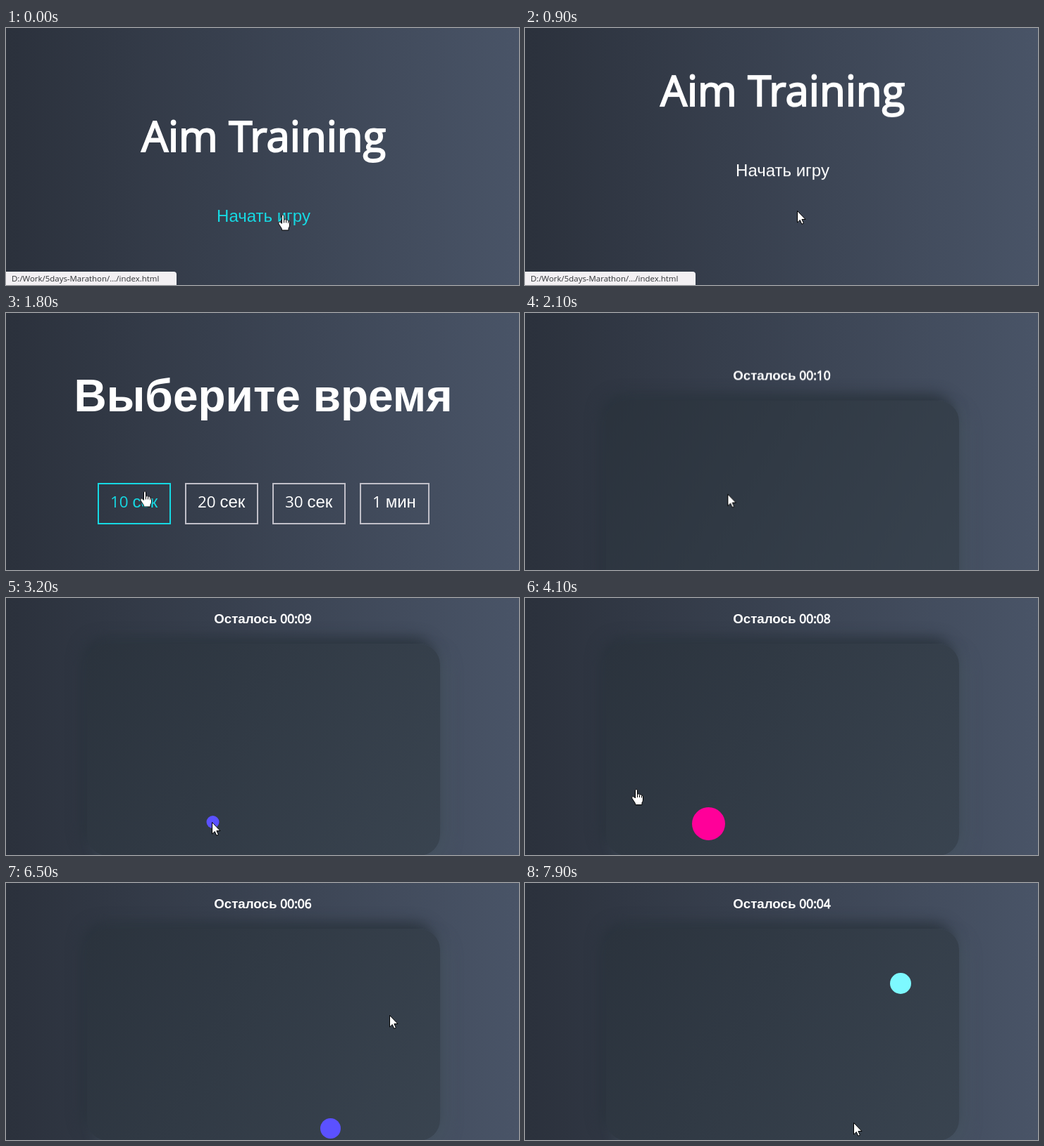
An HTML page for the animation above (8000 ms loop, 728x366 px).

```html
<!DOCTYPE html>
<html lang="ru">
<head>
<meta charset="utf-8">
<title>Aim Training</title>
<style>
html, body { margin: 0; width: 100%; height: 100%; overflow: hidden; }
body { background: linear-gradient(90deg, #2b313c, #495467); }
.stage { position: relative; width: 728px; height: 366px; overflow: hidden; }
.stage * { animation-duration: 8s; animation-iteration-count: infinite; }
svg { position: absolute; left: 0; top: 0; overflow: visible; }
text { font-family: "Liberation Sans", Arial, sans-serif; fill: #fff; }
.latin { font-family: "Open Sans", sans-serif; }

/* three screens stacked in one track */
.track { position: absolute; inset: 0 0 auto; height: 1098px; animation-name: slide; }
.board {
  position: absolute; left: 115px; top: 797px; width: 501px; height: 302px;
  border-radius: 30px;
  background: linear-gradient(118.38deg, #2a323c -4.6%, #485563 200.44%);
  box-shadow: -8px -8px 20px #2a333d, 10px 7px 20px #475462;
}
@keyframes slide {
  0%, 10.35% { transform: none; animation-timing-function: ease; }
  16.6%, 22.9% { transform: translateY(-366px); animation-timing-function: ease; }
  29.15%, 100% { transform: translateY(-732px); }
}

/* start screen */
.logo { font-size: 59.8px; stroke: #fff; stroke-width: 2px; }
.start { font-size: 24px; animation-name: start; animation-timing-function: step-end; }
@keyframes start { 0% { fill: #16d9e3; } 11% { fill: #fff; } }

/* time choice */
.title { font: bold 64px "Liberation Sans", Arial, sans-serif; }
.times text { font-size: 24px; }
.times .latin { font-size: 22.4px; }
.times rect { fill: none; stroke: #c0bfc8; stroke-width: 2px; }
.times g:first-child > * { animation-timing-function: step-end; }
.times g:first-child rect { animation-name: edge; }
.times g:first-child text { animation-name: label; }
@keyframes edge { 0%, 24.5% { stroke: #c0bfc8; } 21.6% { stroke: #16d9e3; } }
@keyframes label { 0%, 24.5% { fill: #fff; } 21.6% { fill: #16d9e3; } }

/* game */
.left { font: bold 18.72px "Liberation Sans", Arial, sans-serif; }
.clock {
  position: absolute; left: 389.3px; top: 751px; color: #fff;
  font: 17.4px/20px "Open Sans", sans-serif; -webkit-text-stroke: .8px #fff;
}
.clock::after { content: "10"; animation: clock 8s step-end infinite; }
@keyframes clock {
  0% { content: "10"; }
  36% { content: "09"; }
  48.5% { content: "08"; }
  61% { content: "07"; }
  73.5% { content: "06"; }
  86% { content: "05"; }
  98.5%, 100% { content: "04"; }
}
.ball { animation-name: ball; animation-timing-function: step-end; }
@keyframes ball {
  0% { cx: 293.5px; cy: 319px; r: 9px; fill: #5b51ff; }
  41.5% { cx: 165px; cy: 270px; r: 20px; fill: #7df9ff; }
  51.2% { cx: 260.5px; cy: 321.5px; r: 23.5px; fill: #ff0099; }
  64% { cx: 596px; cy: 160px; r: 16px; fill: #ff0099; }
  78.7% { cx: 460.5px; cy: 349.5px; r: 14.5px; fill: #5b51ff; }
  95.5%, 100% { cx: 533px; cy: 143px; r: 15px; fill: #7df9ff; }
}

.status {
  position: absolute; left: 0; top: 347px; width: 242px; height: 19px;
  border-radius: 0 4px 0 0; background: #f3f0f3; color: #303336;
  font: 11.45px/20px "Open Sans", sans-serif; text-indent: 8px; white-space: nowrap;
  animation-name: status; animation-timing-function: linear;
}
@keyframes status { 0%, 13% { opacity: 1; } 16.1%, 100% { opacity: 0; } }

/* pointer */
.pointer { animation-name: move; animation-timing-function: ease-in-out; }
.pointer g { fill: #fff; stroke: #000; stroke-linejoin: round; animation-name: shape; animation-timing-function: step-end; }
.hand { --over: 1; --off: 0; }
.arrow { --over: 0; --off: 1; }
@keyframes shape {
  0%, 21.6%, 40.4%, 50.3%, 60.5%, 77.3%, 86.8% { opacity: var(--over); }
  11%, 24.5%, 42%, 56.4%, 64.6%, 79%, 98.6%, 100% { opacity: var(--off); }
}
@keyframes move {
  0%, 7% { transform: translate(393px, 265.5px); }
  11%, 17.5% { transform: translate(387px, 261px); }
  22%, 23.2% { transform: translate(197px, 253.5px); }
  28.7% { transform: translate(350px, 262px); }
  35% { transform: translate(312px, 332px); }
  40%, 41.4% { transform: translate(293px, 320px); }
  46.2%, 48.7% { transform: translate(96px, 292px); }
  51%, 56.2% { transform: translate(158px, 272px); }
  62%, 64.2% { transform: translate(249px, 319.5px); }
  66.3% { transform: translate(302px, 280px); }
  73% { transform: translate(612px, 185px); }
  77.5%, 78.7% { transform: translate(600px, 165px); }
  81.25% { transform: translate(545px, 189px); }
  84% { transform: translate(310px, 290px); }
  87.5%, 90% { transform: translate(455px, 342px); }
  95%, 97.5% { transform: translate(466px, 341px); }
  98.7%, 100% { transform: translate(467px, 342px); }
}
</style>
</head>
<body>
<div class="stage">
  <div class="track">
    <div class="board"></div>
    <svg width="728" height="1098">
      <text class="logo latin" x="365.7" y="176" text-anchor="middle">Aim Training</text>
      <text class="start" x="365.5" y="276" text-anchor="middle">Начать игру</text>
      <g transform="translate(0 366)">
        <text class="title" x="365" y="140" text-anchor="middle">Выберите время</text>
        <g class="times">
          <g><rect x="131" y="243" width="102" height="57"/><text x="148" y="276.5"><tspan class="latin">10 </tspan>сек</text></g>
          <g><rect x="255" y="243" width="102" height="57"/><text x="272" y="276.5"><tspan class="latin">20 </tspan>сек</text></g>
          <g><rect x="379" y="243" width="102" height="57"/><text x="396" y="276.5"><tspan class="latin">30 </tspan>сек</text></g>
          <g><rect x="503" y="243" width="97" height="57"/><text x="520" y="276.5"><tspan class="latin">1 </tspan>мин</text></g>
        </g>
      </g>
      <g transform="translate(0 732)">
        <text class="left" x="295.2" y="36">Осталось</text>
        <circle class="ball"/>
      </g>
    </svg>
    <div class="clock">00:</div>
  </div>
  <div class="status">D:/Work/5days-Marathon/.../index.html</div>
  <svg width="728" height="366">
    <g class="pointer">
      <g class="hand">
        <path d="M-1.5 12V1.5Q0-.6 1.5 1.5V7.5Q3.5 6 4.5 8Q6.5 7 7.5 9Q9.5 8.5 9.5 11V15Q9.5 18 8 19.5V22.5H-1.5V20.5L-6 13.5Q-7 11-5 10.5Q-3.5 10.5-1.5 13Z"/>
        <path d="M1.5 7.5V12M4.5 8.5V12M7.5 9.5V12.5"/>
      </g>
      <g class="arrow">
        <path d="M-.5-.5V16L3.3 12.5L5.8 18.3L8.4 17.1L5.9 11.5H11Z"/>
      </g>
    </g>
  </svg>
</div>
</body>
</html>
```
